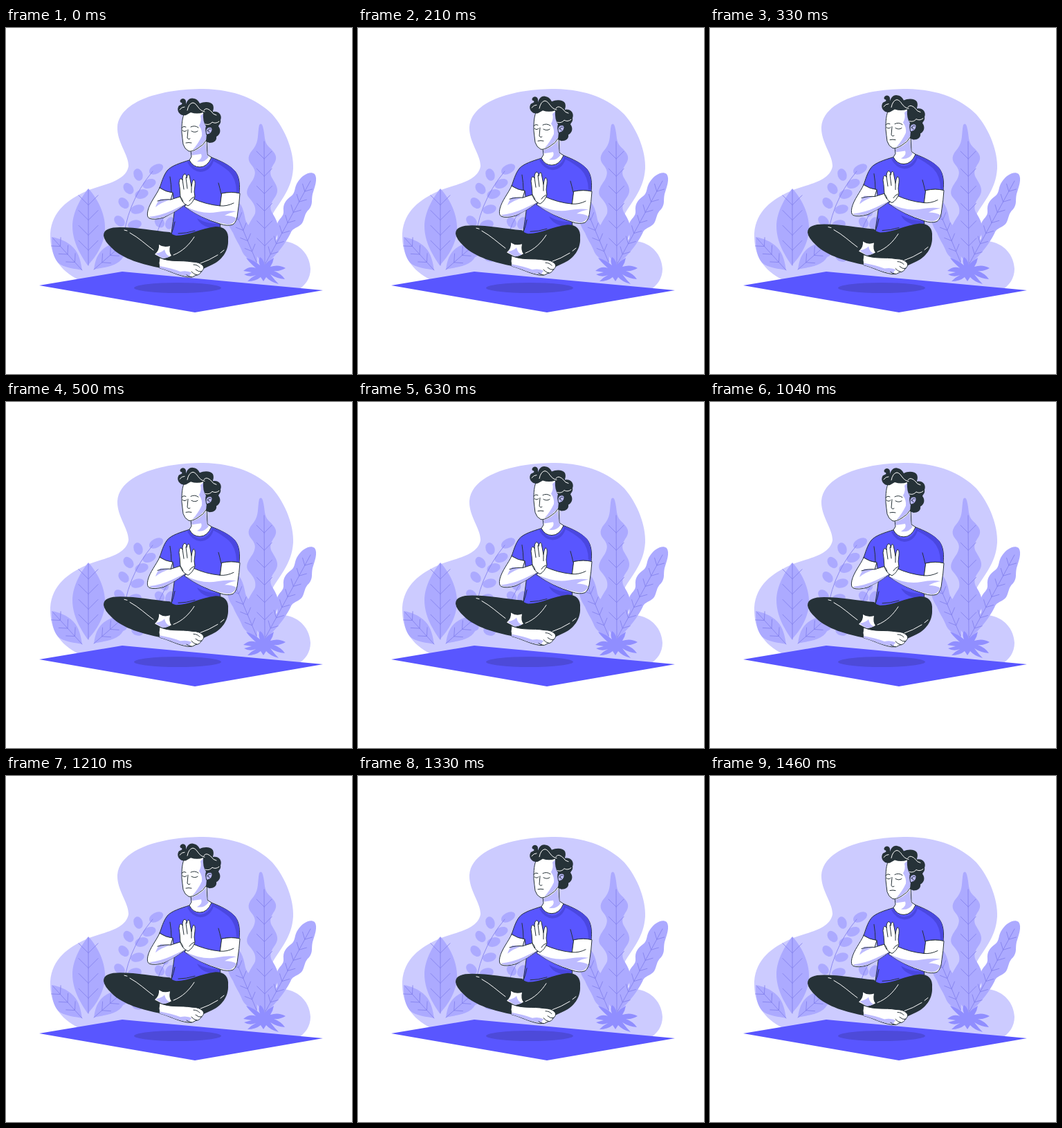
An HTML page for the animation above (1500 ms loop, 500 by 500 pixels).

```html
<!DOCTYPE html>
<html lang="en">
<head>
<meta charset="utf-8">
<title>Floating meditation</title>
<style>
  html, body { margin: 0; width: 100%; height: 100%; overflow: hidden; background: #fff; }
  svg { display: block; width: 100vw; height: 100vh; }
  path { stroke-linecap: round; stroke-linejoin: round; }
  .leaf { fill: #acaaff; }
  .vein { fill: none; stroke: #8583ee; stroke-width: .9; }
  .ink { stroke: #263238; stroke-width: 1; }
  .line { fill: none; }
  .skin { fill: #fff; }
  .shade { fill: #bdbbff; }
  .shirt { fill: #5956ff; }
  .fold { fill: #4a47e0; }
  .dark { fill: #263238; }
  .light { fill: none; stroke: #fff; stroke-width: 1; }
</style>
</head>
<body>
<svg viewBox="0 0 500 500">
  <path fill="#cccbff" d="M105 364C78 350 63 330 64 297C66 265 90 247 118 235C140 226 173 222 177 200C178 184 160 165 161 143C164 105 225 88 285 88C330 89 362 102 385 125C405 148 416 180 415 203C413 235 395 250 382 275C372 298 381 305 402 308C425 311 439 328 440 348C440 362 432 372 424 377L270 395Z"/>

  <g class="leaf">
    <path d="M119 232C109 244 96 266 96 286C96 310 109 330 118 343C130 331 144 310 143 286C142 264 130 244 119 232Z"/>
    <path d="M66 302C66 318 68 335 79 342C88 347 101 348 110 350C108 338 106 326 97 317C88 308 77 304 66 302Z"/>
    <path d="M127 349C129 335 132 326 142 318C152 311 164 308 177 306C175 320 171 334 160 340C150 346 138 346 127 349Z"/>
    <path d="M366 140Q369 136 371 142C375 156 372 164 380 172C387 179 394 185 388 195C383 203 380 208 384 216C390 226 396 234 389 244C384 251 380 258 384 266C391 277 397 288 391 302Q386 324 374 342C362 332 352 316 349 300C346 286 356 277 360 268C362 258 357 252 351 245C344 236 352 227 357 219C362 209 360 204 354 197C347 188 352 181 358 174C366 163 363 154 366 140Z"/>
    <path d="M374 342C380 330 382 318 389 309C396 302 389 292 392 283C394 275 402 273 401 264C400 254 405 248 412 243C419 238 416 230 422 222C428 213 439 206 446 211C451 218 446 230 443 240C441 249 444 254 438 262C431 268 432 275 428 282C423 289 414 288 411 297C406 307 393 328 374 342Z"/>
    <path d="M330 246C342 253 344 267 346 277C348 284 354 286 354 295C354 305 364 317 363 340C353 335 344 332 340 320C336 311 332 306 328 296C323 288 319 281 320 270Z"/>
    <g id="sprig"></g>
  </g>
  <path id="veins" class="vein"/>
  <path fill="#908eff" d="M343 351Q352 343 361 347Q350 337 347 332Q359 336 367 343Q364 336 367 331Q372 334 374 342Q380 336 387 332Q386 339 382 345Q394 341 404 347Q396 352 387 351Q398 355 403 363Q391 362 382 356Q388 364 394 370Q382 367 376 360L372 366L368 360Q361 366 349 366Q355 360 361 357Q352 361 344 356L355 353Z"/>

  <path fill="#5956ff" d="M48 372L168 352L458 379L273 411Z"/>
  <ellipse cx="248" cy="375.500" rx="63" ry="7.500" fill="#4d4ad9"/>

  <g id="person">
    <!-- torso -->
    <path class="shirt ink" d="M265 191C252 195 239 199 233 206C227 214 225 223 222 231Q230 237 241 238L244 260Q242 278 238 302L310 302L309 258L312 239Q326 236 337 239C338 228 338 216 331 207C323 198 310 192 297 187Z"/>
    <path class="fold" d="M297 188C313 193 325 199 332 208C338 218 337 228 337 238L333 237Q333 218 322 207Q310 197 297 191Z"/>
    <path class="fold" d="M265 192Q272 204 281 204Q293 203 298 190L300 192Q295 207 281 208Q269 207 262 194Z"/>
    <path class="fold" d="M276 275Q292 284 309 283L309 293L292 288Q280 284 276 275Z"/>
    <path class="ink line" d="M237 215Q239 226 239 238M311 240Q309 231 307 224M249 297Q260 297 273 293M244 280Q242 290 239 298"/>

    <!-- neck and face -->
    <path class="skin ink" d="M267 177L268 186L265 191Q270 201 280 201Q291 201 297 187L291 183L290 160Z"/>
    <path class="shade" d="M268 179Q280 176 289 165L290.500 183L293 186Q287 195 276 193Q285 188 282 182Q276 183 268 184Z"/>
    <path class="skin ink" d="M259 121C254 129 254 140 254 151Q255 160 256 168Q258 175 264 178Q269 179 277 174Q285 170 291 160L295 130L283 119Z"/>
    <path class="shade" d="M285 123L281 127Q283 134 279 141Q284 148 283 156Q278 167 269 177Q282 172 290 160L292 141Z"/>
    <path class="ink line" d="M254 144Q257 141 260 143M267 143Q273 140 278 144M255 148Q258 151 261 148M268 149Q273 152 277 149M263 147L262 159Q264 162 266 160M260 166Q264 165 268 166"/>
    <path class="dark" d="M260 126C252 128 246 120 249 114C250 110 256 112 254 108C250 108 251 102 256 102C261 103 260 107 260 110C262 103 267 100 272 102C277 103 279 107 280 109C286 106 296 106 299 111C301 116 299 119 299 121C307 119 313 126 310 133C311 138 308 139 307 142C311 147 310 154 304 157C305 163 300 166 294 166L289 164L290 153Q287 147 289 142Q284 135 285 122Q276 125 267 122Z"/>
    <path class="light" d="M262 119Q264 109 270 108C277 109 277 119 287 121M286 119C289 114 294 118 297 121Q299 125 304 126M288 139Q294 141 298 136Q303 139 308 135M251 118Q254 114 258 114"/>
    <path class="shade ink" d="M289 150C288 143 297 141 298 146C298 150 295 154 290 154Z"/>
    <path class="ink line" d="M291 149Q292 145 296 146M292 148L294 151"/>

    <!-- arms and hands -->
    <path class="skin ink" d="M222 231Q231 237 241 238L238 248L254 243L261 254Q245 266 228 274Q214 278 207 275Q203 273 205 264C208 252 217 242 222 231Z"/>
    <path class="shade" d="M206 273Q224 271 239 264L258 255Q240 270 225 274Q212 277 206 273ZM223 247Q218 252 216 259Q224 252 238 248Z"/>
    <path class="ink line" d="M219 250Q230 247 238 248"/>
    <path class="skin ink" d="M312 239Q326 236 338 239Q337 254 335 266Q334 280 328 284Q320 287 309 283Q282 275 258 258L269 246Q288 255 309 257Z"/>
    <path class="shade" d="M259 258Q284 270 305 266Q321 263 333 265Q322 267 316 271Q327 271 333 275Q329 284 320 284Q283 277 259 258Z"/>
    <path class="ink line" d="M309 257Q319 258 329 253"/>
    <path class="skin ink" d="M252 244L251 231Q249 223 251 219Q253 216 255 220Q255 212 258 211Q261 211 261 217Q263 209 265 213L268 229Q269 221 271 219Q274 220 273 228Q271 237 273 244Q270 253 263 257Q254 253 252 244Z"/>
    <path class="ink line" d="M255 219L257 233M260 216L262 232M268 229L268 238M252 244Q255 247 256 251M272 244Q267 246 265 250"/>

    <!-- legs and feet -->
    <path class="dark" d="M141 300C141 291 150 288 165 288C190 288 213 293 237 295Q240 299 246 300C265 300 282 289 303 287C316 287 322 294 321 306C322 323 311 336 298 342L283 349L224 347C198 342 169 334 153 318Q142 308 141 300Z"/>
    <path class="skin" d="M221 313Q228 318 237 315Q235 324 239 329Q232 333 226 333Q219 329 215 327Q222 321 221 313Z"/>
    <path class="shade" d="M216 326Q226 324 229 320Q231 329 237 330Q231 333 226 333Z"/>
    <path class="skin ink" d="M222 332C238 339 252 335 269 338Q280 338 285 344Q287 349 282 352Q280 357 275 357Q270 361 263 360C248 358 235 350 222 347Q220 340 222 332Z"/>
    <path class="shade" d="M222 344Q239 347 252 352Q262 350 269 354Q264 356 266 359C250 359 236 350 222 347Z"/>
    <path class="ink line" d="M283 352Q278 353 274 349M276 357Q271 356 268 352M268 360Q263 359 261 357M271 342Q277 342 280 346"/>
    <path class="light" d="M171 292L175 293M179 296C192 303 202 313 213 321M242 328C255 323 265 313 272 302M281 340Q293 336 306 328M310 325L315 321"/>
  </g>
</svg>
<script>
const PERIOD = 1500, RISE = 10;
const byId = id => document.getElementById(id);

// Midrib with paired side veins slanting towards the tip.
function rib(bx, by, tx, ty, pairs, size) {
  const length = Math.hypot(tx - bx, ty - by);
  const ux = (tx - bx) / length, uy = (ty - by) / length;
  let d = `M${bx} ${by}L${tx} ${ty}`;
  for (let i = 1; i <= pairs; i++) {
    const at = length * i / (pairs + 1), x = bx + ux * at, y = by + uy * at;
    for (const side of [-size, size])
      d += `M${x} ${y}l${ux * size - uy * side} ${uy * size + ux * side}`;
  }
  return d;
}

byId('veins').setAttribute('d',
  rib(119, 343, 119, 234, 4, 14) + rib(110, 350, 68, 304, 3, 9) +
  rib(127, 349, 174, 308, 3, 9) + rib(374, 340, 373, 164, 6, 11) +
  rib(374, 342, 440, 221, 7, 8) + rib(362, 338, 330, 262, 4, 8) +
  'M169 315Q172 255 212 207M213 315Q220 280 240 255');

// Leaflets: centre, half length, tilt.
byId('sprig').innerHTML = [
  [217, 204, 11, -28], [191, 212, 9, 72], [207, 225, 10, -22], [177, 232, 9, 52],
  [196, 240, 10, -18], [170, 253, 9, 48], [190, 262, 10, -14], [164, 279, 9, 45],
  [186, 284, 10, -12], [228, 264, 9, 60], [222, 281, 8, 50], [237, 282, 9, -65],
  [166, 324, 9, 20], [190, 331, 9, 20]
].map(([x, y, r, tilt]) =>
  `<ellipse rx="${r}" ry="6.5" transform="translate(${x} ${y}) rotate(${tilt})"/>`).join('');

const person = byId('person');
function draw(now) {
  const phase = now % PERIOD / PERIOD;
  const lift = RISE * (1 - Math.abs(1 - 2 * phase));
  person.setAttribute('transform', `translate(0 ${-lift})`);
  requestAnimationFrame(draw);
}
draw(performance.now());
</script>
</body>
</html>
```
